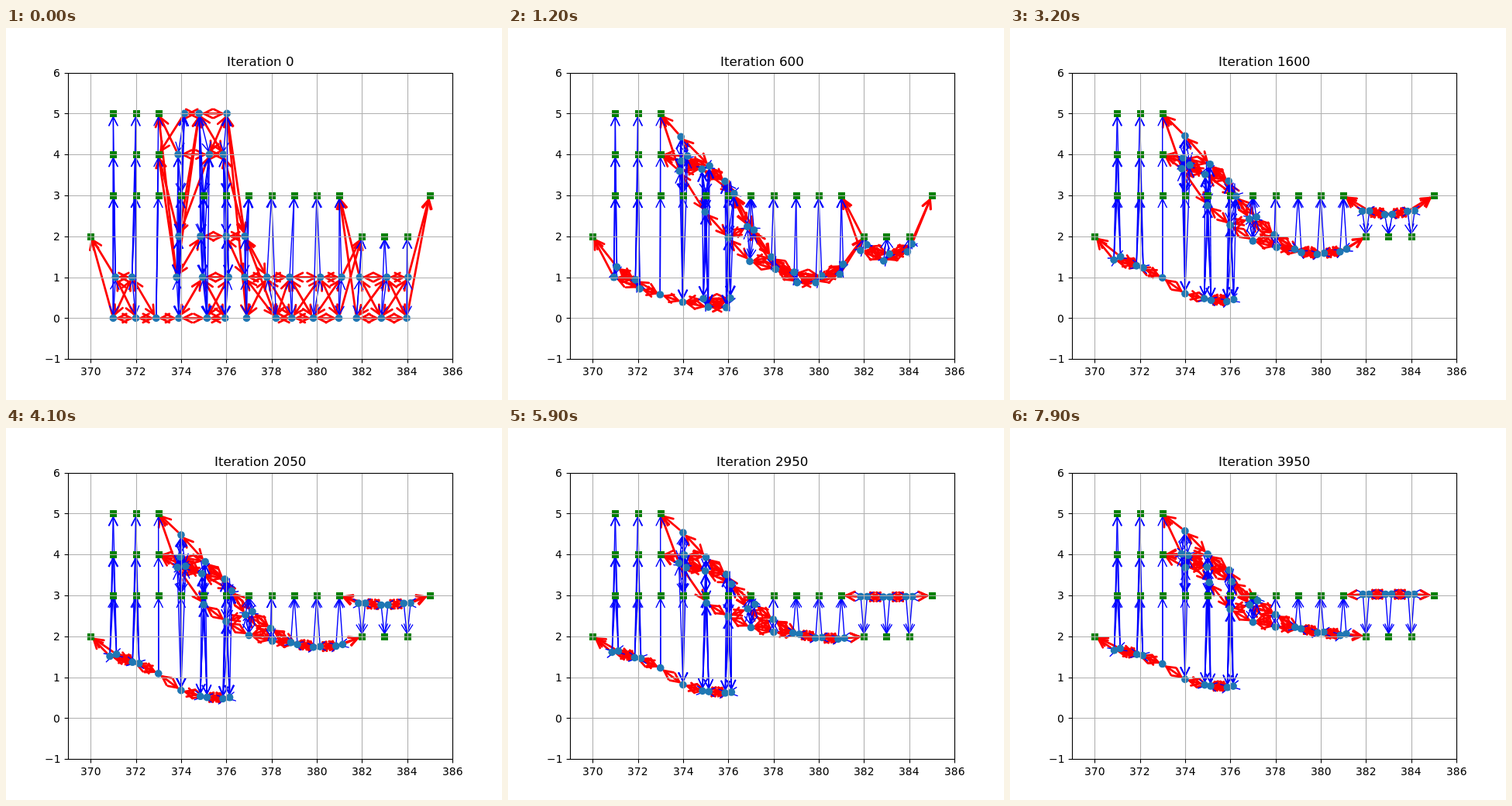
An HTML page with a canvas for the animation above (8000 ms loop, 640x480 px).

```html
<!DOCTYPE html>
<html>
<head>
<meta charset="utf-8">
<style>
html, body { margin: 0; width: 100%; height: 100%; overflow: hidden; background: #fff; }
canvas { display: block; }
</style>
</head>
<body>
<canvas id="stage" width="640" height="480"></canvas>
<script>
const ctx = document.getElementById('stage').getContext('2d');
const PT = 100 / 72, FONT = '"DejaVu Sans", sans-serif';
const FRAMES = 80, STEPS = 50;       // steps of the layout per frame
const RATE = .006, PUSH = .011;      // speed of relaxation, strength of repulsion
const px = x => 80 + (x - 369) * 496 / 17;
const py = y => 374.4 - y * 52.8;
const snap = v => Math.round(v) + .5;

const nodes = [], pulls = [], pushes = [];

function add(col, offsets, heights, fixed) {
  const made = offsets.map((dx, i) =>
    ({ col, fixed, x: col + dx, y: heights ? heights[i] : i, near: [] }));
  nodes.push(...made);
  return made;
}
const pin = (col, ...ys) => add(col, ys.map(() => 0), ys, true);
const stack = (col, ...offsets) => add(col, offsets);

// Pairs of indices such as '01', or every combination when omitted.
function link(a, b, pairs) {
  a.forEach((p, i) => b.forEach((q, j) => {
    if (pairs && !pairs.split(' ').includes('' + i + j)) return;
    pulls.push([p, q]);
    p.near.push(q);
    q.near.push(p);
  }));
}

function chain(...cols) {
  cols.slice(1).forEach((c, i) => link(cols[i], c));
}

// Pinned points
const left = pin(370, 2);
for (let c = 371; c <= 380; c++) pin(c, 3);
for (let c = 371; c <= 372; c++) pin(c, 4, 5);
const top373 = pin(373, 4, 5);
const end381 = pin(381, 3), end382 = pin(382, 2);
pin(383, 2);
pin(384, 2);
const right = pin(385, 3);

// Lower branch
chain(left, stack(371, 0, .1), stack(372, 0, -.17), stack(373, -.1),
  stack(374, -.1), stack(375, .15, -.05), stack(376, -.05, .1));

// Upper branch
const u374 = add(374, [-.2, -.1, -.13, .15], [1, 2, 4, 5]);
const u375 = add(375, [-.14, .25, -.2], [2, 4, 5]);
const u376 = add(376, [0, -.13, .03], [2, 4, 5]);
const u377 = stack(377, -.1, -.18, -.18);
const u378 = stack(378, .2, -.2);
link(u374, top373, '00 01 10 21 30');
link(u374, u375, '00 02 11 12 21 32');
link(u375, u376, '00 11 12 21 22');
link(u376, u377, '01 02 12 20 22');
link(u377, u378, '01 10 11 20 21');
chain(u378, stack(379, -.1, -.2), stack(380, -.15, .16), stack(381, -.02, .1), end382);

// Right branch
chain(end381, stack(382, -.24, -.1), stack(383, -.14, .1), stack(384, -.02, .04), right);

// Points of one column push each other apart
nodes.forEach((p, i) => nodes.slice(i + 1).forEach(q => {
  if (p.col === q.col && !(p.fixed && q.fixed)) pushes.push([p, q]);
}));

const moving = nodes.filter(n => !n.fixed);

// Each point seeks the mean height of its neighbours and the middle of its column
function relax(progress) {
  const hold = .5 + .7 * progress;
  for (const n of moving) {
    n.fx = (n.col - n.x) * hold;
    n.fy = n.near.reduce((sum, m) => sum + m.y, 0) / n.near.length - n.y;
  }
  for (const [p, q] of pushes) {
    const dx = q.x - p.x, dy = q.y - p.y;
    const f = PUSH / Math.max(.08, Math.hypot(dx, dy)) ** 3;
    p.fx -= f * dx;
    p.fy -= f * dy;
    q.fx += f * dx;
    q.fy += f * dy;
  }
  for (const n of moving) {
    n.x += RATE * n.fx;
    n.y += RATE * n.fy;
  }
}

// The whole run is worked out once, so a pose depends on the time alone
const poses = [];
for (let f = 0; f < FRAMES; f++) {
  poses.push(nodes.map(n => ({ x: px(n.x), y: py(n.y) })));
  for (let i = 0; i < STEPS; i++) relax(f / FRAMES);
}
nodes.forEach((n, i) => n.id = i);

function line(x1, y1, x2, y2) {
  ctx.beginPath();
  ctx.moveTo(x1, y1);
  ctx.lineTo(x2, y2);
  ctx.stroke();
}

function arrowHead(x, dir) {
  ctx.beginPath();
  ctx.moveTo(x - dir * 8 * PT, -4 * PT);
  ctx.lineTo(x, 0);
  ctx.lineTo(x - dir * 8 * PT, 4 * PT);
  ctx.stroke();
}

// Only movable points send arrows out
function arrow(p, q, pose, color, width) {
  const a = pose[p.id], b = pose[q.id];
  const len = Math.hypot(b.x - a.x, b.y - a.y);
  const tip = 2 * PT + width * 1.118;
  if (len < 4 * PT) return;
  ctx.save();
  ctx.translate(a.x, a.y);
  ctx.rotate(Math.atan2(b.y - a.y, b.x - a.x));
  ctx.strokeStyle = color;
  ctx.lineWidth = width;
  ctx.lineCap = ctx.lineJoin = 'round';
  line(tip, 0, len - tip, 0);
  if (!p.fixed) arrowHead(len - tip, 1);
  if (!q.fixed) arrowHead(tip, -1);
  ctx.restore();
}

function label(text, x, y, align, size) {
  ctx.font = size * PT + 'px ' + FONT;
  ctx.fillText(text, Math.round(x - ctx.measureText(text).width * align), Math.round(y));
}

function axes(frame) {
  ctx.lineWidth = 1.11;
  ctx.fillStyle = '#000';
  const rule = (color, ...p) => { ctx.strokeStyle = color; line(...p); };
  for (let v = 370; v <= 386; v += 2) {
    const x = snap(px(v));
    rule('#b0b0b0', x, 58, x, 427);
    rule('#000', x, 427.5, x, 432.4);
    label(v, px(v), 448, .5, 10);
  }
  for (let v = -1; v <= 6; v++) {
    const y = snap(py(v));
    rule('#b0b0b0', 80, y, 576, y);
    rule('#000', 75.6, y, 80.5, y);
    label(v < 0 ? '\u2212' + -v : v, 70.3, py(v) + 5.2, 1, 10);
  }
  ctx.strokeStyle = '#000';
  ctx.strokeRect(80.5, 58.5, 496, 369);
  label('Iteration ' + frame * STEPS, 328, 49, .5, 12);
}

function draw(time) {
  const frame = Math.floor(time / 100) % FRAMES, pose = poses[frame];
  ctx.fillStyle = '#fff';
  ctx.fillRect(0, 0, 640, 480);
  for (const [p, q] of pulls) arrow(p, q, pose, 'red', 2 * PT);
  for (const [p, q] of pushes) arrow(p, q, pose, 'blue', PT);
  for (const n of nodes) {
    const { x, y } = pose[n.id];
    ctx.fillStyle = n.fixed ? '#008000' : '#1f77b4';
    ctx.beginPath();
    if (n.fixed) ctx.rect(snap(x) - 4.5, snap(y) - 4.5, 9, 9);
    else ctx.arc(x, y, 4.86, 0, 7);
    ctx.fill();
  }
  axes(frame);
}

const start = performance.now();
function tick() {
  draw(performance.now() - start);
  requestAnimationFrame(tick);
}
tick();
</script>
</body>
</html>
```
